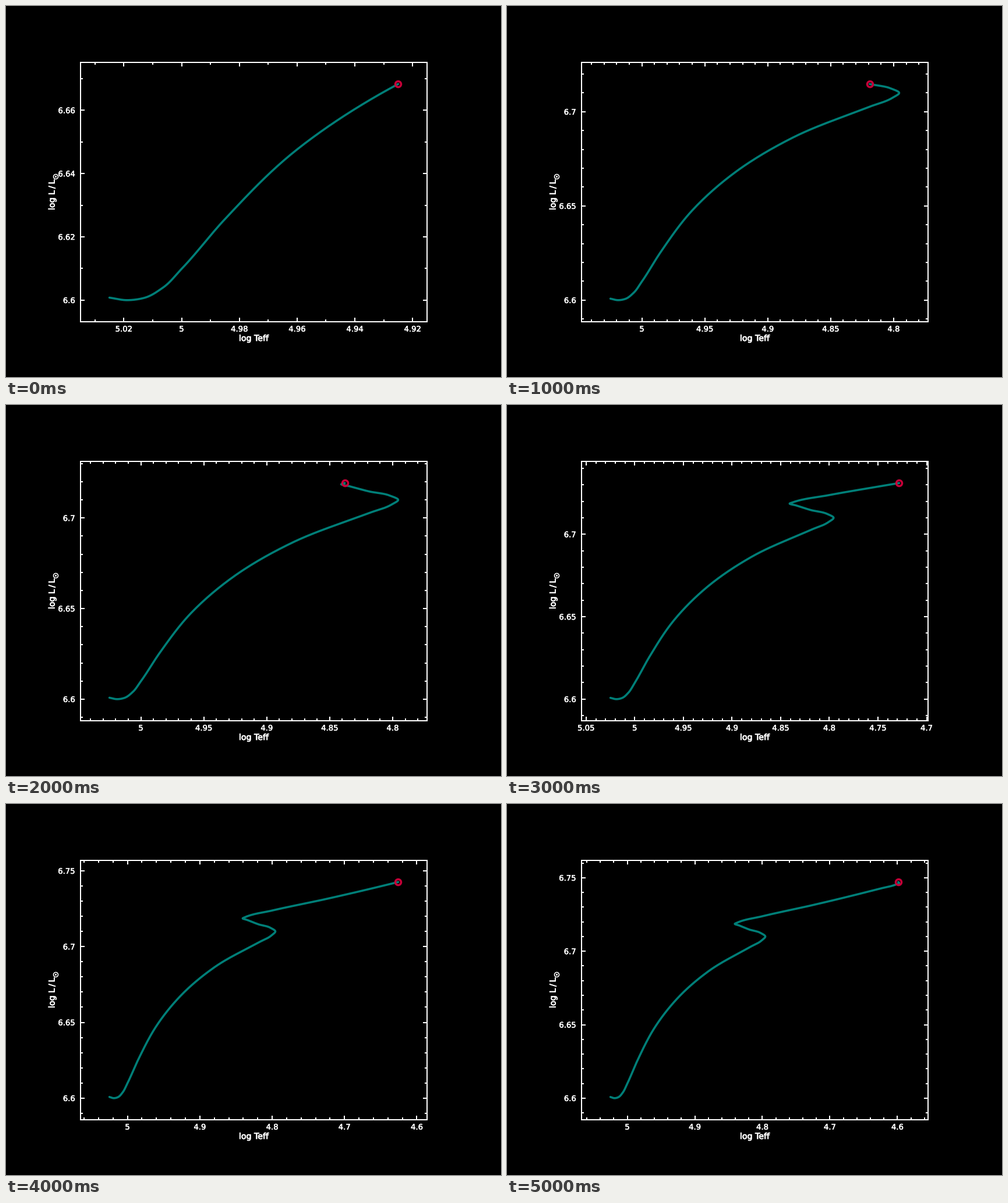
Write a matplotlib script that moves like this. It is 850 px wide and 638 px high and loops after 6000 ms.

```python
import numpy as np
import matplotlib.pyplot as plt
from matplotlib.animation import FuncAnimation
from matplotlib.patheffects import withStroke
from matplotlib.ticker import MultipleLocator

W, H, DPI = 850, 638, 100
PX = 72 / DPI  # one pixel in points
TEAL, RED = "#007f78", "#c60038"
LEFT, RIGHT, TOP, BOTTOM = 128, 723, 97, 543
START = np.array([5.025, 6.6])

# Key points of the track, one leg per step, in 1e-4 dex:
# cooling from log Teff 5.025, brightening from log L 6.6
LEGS = [
    [(0, 8), (60, 0), (120, 7), (183, 38), (248, 97), (400, 256), (651, 477),
     (1000, 683)],
    [(1447, 862), (2057, 1026), (2241, 1074), (2294, 1100), (2230, 1123),
     (2060, 1147)],
    [(1909, 1175), (1843, 1187), (1870, 1193)],
    [(2250, 1238), (2968, 1311)],
    [(3992, 1426)],
    [(4233, 1455), (4276, 1464), (4263, 1471)],
]
STEPS = 24


def smooth(p):
    """Cubic Hermite curve through p, paced by the distance between points."""
    t = np.append(0, np.cumsum(np.hypot(*(np.diff(p, axis=0) * (1, 2)).T)))
    slope = np.gradient(p, t, axis=0)
    s = (np.arange(STEPS) / STEPS)[:, None]
    parts = []
    for i, h in enumerate(np.diff(t)):
        a, b = p[i], p[i + 1]
        parts.append(a + (b - a) * s * s * (3 - 2 * s)
                     + h * s * (1 - s) * (slope[i] * (1 - s) - slope[i + 1] * s))
    return np.vstack(parts + [p[-1:]])


track = smooth(np.array(sum(LEGS, []), float))
track = START + track * (-1e-4, 1e-4)
ends = (np.cumsum([len(leg) for leg in LEGS]) - 1) * STEPS + 1


def bold(px):
    return [withStroke(linewidth=px * PX, foreground="white")]


def set_ticks(axis, span):
    major = 0.02 if span < 0.13 else 0.05 if span < 0.42 else 0.1
    axis.set_major_locator(MultipleLocator(major))
    axis.set_minor_locator(MultipleLocator(max(0.01, major / 5)))
    axis.set_major_formatter(lambda v, pos: f"{v:.5g}")


plt.rcParams["font.family"] = "DejaVu Sans"
fig = plt.figure(figsize=(W / DPI, H / DPI), dpi=DPI, facecolor="black")
ax = fig.add_axes([LEFT / W, 1 - BOTTOM / H, (RIGHT - LEFT) / W, (BOTTOM - TOP) / H],
                  facecolor="none")
ax.spines[:].set(color="white", linewidth=2 * PX)
for which, length in (("major", 7), ("minor", 4)):
    ax.tick_params(which=which, direction="in", top=True, right=True, color="white",
                   length=length * PX, width=2 * PX)
ax.tick_params(labelcolor="white", labelsize=13.2 * PX)
ax.tick_params(axis="x", pad=6.8 * PX)
ax.tick_params(axis="y", pad=9.3 * PX)

title = dict(color="white", size=14.2 * PX, va="baseline", path_effects=bold(0.8))
fig.text(425.5 / W, 1 - 576 / H, "log Teff", ha="center", **title)
fig.text(83.5 / W, 1 - 351 / H, "log L\u2009/\u2009L", ha="left", rotation=90,
         rotation_mode="anchor", **title)
for size, fill in ((8, "none"), (1.5, "white")):
    fig.add_artist(plt.Line2D([84.5 / W], [1 - 293 / H], marker="o", ms=size * PX,
                              mfc=fill, mec="white", mew=1.6 * PX))

line, = ax.plot([], [], color=TEAL, lw=3.6 * PX, solid_capstyle="round", zorder=4)
ring, = ax.plot([], [], "o", ms=10 * PX, mfc="none", mec=RED, mew=3.5 * PX, zorder=5)


def draw(i):
    x, y = track[:ends[i]].T
    line.set_data(x, y)
    ring.set_data(x[-1:], y[-1:])
    dx, dy = np.ptp(x), np.ptp(y)
    ax.set_xlim(x.max() + 0.1 * dx, x.min() - 0.1 * dx)
    ax.set_ylim(y.min() - 0.1 * dy, y.max() + 0.1 * dy)
    set_ticks(ax.xaxis, 1.2 * dx)
    set_ticks(ax.yaxis, 1.2 * dy)
    for text in ax.get_xticklabels() + ax.get_yticklabels():
        text.set_path_effects(bold(0.5))
    return line, ring


anim = FuncAnimation(fig, draw, frames=len(LEGS), interval=1000,
                     repeat=True, repeat_delay=0, blit=False)
plt.show()
```
